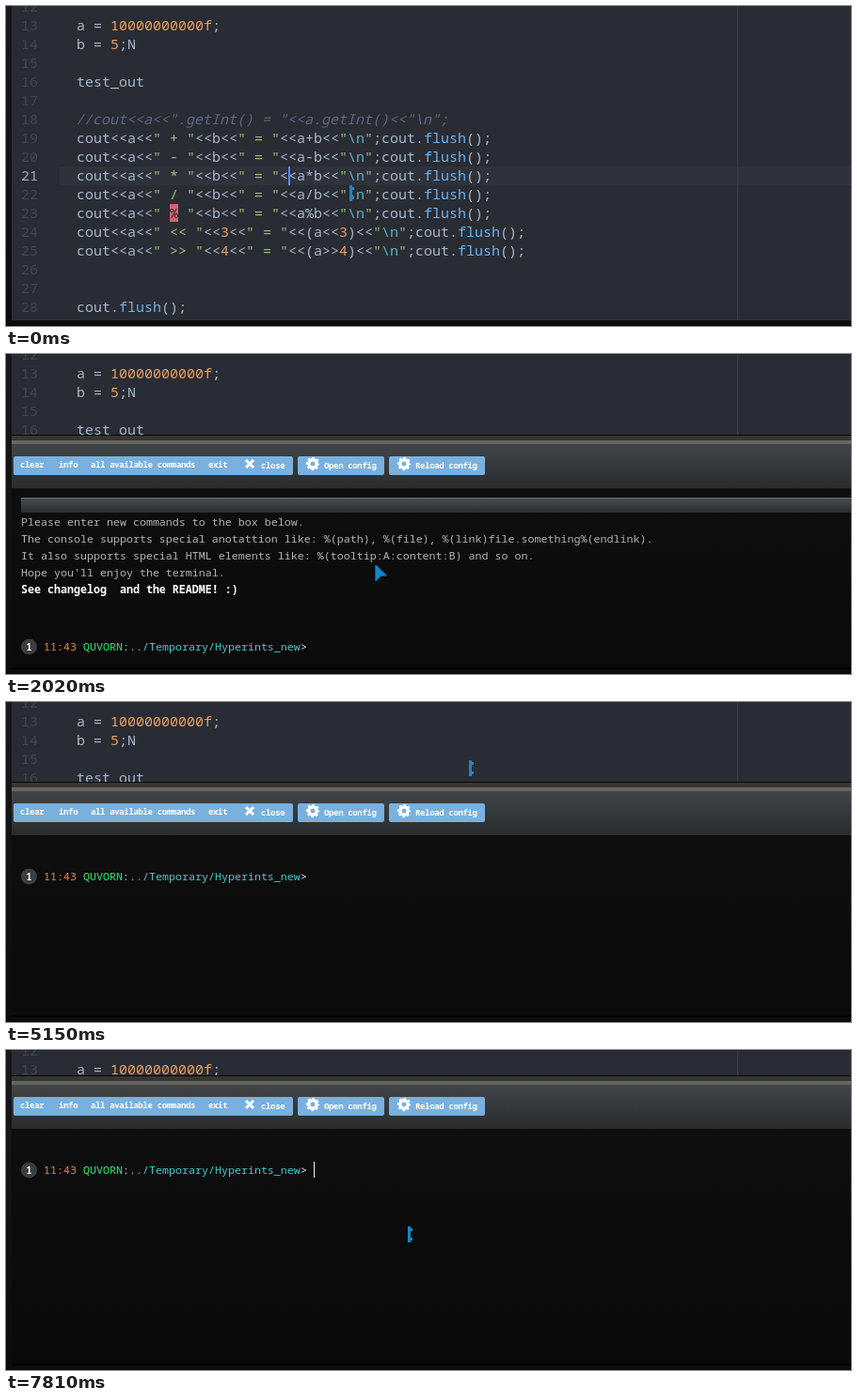
An HTML page with a canvas that plays this animation: 898x341 px, repeating every 8000 ms.

```html
<!DOCTYPE html>
<html lang="en">
<head>
<meta charset="utf-8">
<title>Editor with terminal panel</title>
<style>
html, body { margin: 0; width: 898px; height: 341px; overflow: hidden; background: #0c0c0d; }
canvas { display: block; }
</style>
</head>
<body>
<canvas id="stage" width="898" height="341"></canvas>
<script>
const ctx = document.getElementById('stage').getContext('2d');
const LOOP = 8000, BOTTOM = 335, RIGHT = 898;
const FAMILY = '"Noto Sans Mono", "DejaVu Sans Mono", monospace';
const CODE_FONT = `15px ${FAMILY}`;
const TERM_FONT = `11.67px ${FAMILY}`;
const PROMPT_FONT = `500 ${TERM_FONT}`;
const BUTTON_FONT = `bold 9px ${FAMILY}`;
const PLAIN = '#a5b7cd';

const operation = op => `cout<<a<<" ${op} "<<b<<" = "<<a${op}b<<"\\n";cout.flush();`;
const shift = (op, n) => `cout<<a<<" ${op} "<<${n}<<" = "<<(a${op}${n})<<"\\n";cout.flush();`;
const FIRST_LINE = 12;
const code = [
  '', 'a = 10000000000f;', 'b = 5;N', '', 'test_out', '',
  '//cout<<a<<".getInt() = "<<a.getInt()<<"\\n";',
  ...['+', '-', '*', '/', '%'].map(operation),
  shift('<<', 3), shift('>>', 4), '', '', 'cout.flush();'
];
const welcome = [
  'Please enter new commands to the box below.',
  'The console supports special anotattion like: %(path), %(file), %(link)file.something%(endlink).',
  'It also supports special HTML elements like: %(tooltip:A:content:B) and so on.',
  "Hope you'll enjoy the terminal.",
  'See changelog  and the README! :)'
];
const listing = 'README.md  changelog.txt  hyperints.cpp  hyperints.h  script.cpp';

// Keys are [time, value, ...]
const panelKeys = [[910, 335], [1120, 231], [1330, 150], [1680, 87], [2440, 87], [2860, 212],
  [4800, 212], [5150, 86], [5360, 28]];
const mouseKeys = [[280, 364, 191], [490, 385, 175], [1190, 385, 175], [1680, 392, 225],
  [2230, 392, 225], [2440, 465, 91], [2860, 466, 208], [3210, 466, 208], [3280, 471, 222],
  [3630, 498, 221], [3980, 498, 224], [4450, 498, 220], [4590, 498, 220], [4730, 493, 209],
  [4870, 491, 205], [5150, 491, 62], [5360, 491, 24], [5640, 427, 188]];

const within = (t, a, b) => t >= a && t < b;

function track(keys, t) {
  const i = keys.findIndex(k => k[0] > t);
  if (i === 0) return keys[0].slice(1);
  if (i < 0) return keys[keys.length - 1].slice(1);
  const a = keys[i - 1], b = keys[i], u = (t - a[0]) / (b[0] - a[0]);
  return a.slice(1).map((v, j) => Math.round(v + (b[j + 1] - v) * u));
}

function rect(x, y, w, h, fill) {
  ctx.fillStyle = fill;
  ctx.fillRect(x, y, w, h);
}

function shade(y, h, from, to) {
  const g = ctx.createLinearGradient(0, y, 0, y + h);
  g.addColorStop(0, from);
  g.addColorStop(1, to);
  return g;
}

function text(str, x, y, color, font) {
  ctx.font = font;
  ctx.fillStyle = color;
  ctx.fillText(str, x, y);
}

function drawCode(line, y) {
  if (line.startsWith('//')) return text(line, 74, y, '#5a6785', `italic ${CODE_FONT}`);
  let x = 75, quoted = false;
  for (const token of line.match(/\\n|\w+|./g) || []) {
    let color = PLAIN;
    if (token === '"') quoted = !quoted;
    if (token === '\\n') color = '#56b6c2';
    else if (quoted || token === '"') color = '#98c379';
    else if (/^\d/.test(token)) color = '#e5a064';
    else if (token === 'flush') color = '#6cb2ee';
    if (quoted && token === '%') {
      rect(x, y - 15, 9, 19, '#cf6670');
      color = '#30252b';
    }
    text(token, x, y, color, CODE_FONT);
    x += 9 * token.length;
  }
}

function drawEditor(t) {
  rect(0, 0, RIGHT, 341, '#0c0c0d');
  rect(0, 0, 6, 341, shade(0, 341, '#17181b', '#0b0b0c'));
  rect(6, 0, RIGHT, BOTTOM, '#2a2c33');
  rect(57, 171, RIGHT, 20, '#2f323a');
  rect(777, 0, 1, BOTTOM, '#383b42');
  code.forEach((line, i) => {
    const n = FIRST_LINE + i, y = 6 + i * 20;
    text(String(n), 16, y, n === 21 ? '#a3acba' : '#42464f', CODE_FONT);
    drawCode(line, y);
  });
  if (t < 140 || within(t, 490, 840)) rect(300, 171, 2, 20, '#528bff');
}

function drawGear(x, y) {
  const ring = (r, w, dash) => {
    ctx.lineWidth = w;
    ctx.setLineDash(dash);
    ctx.beginPath();
    ctx.arc(x, y, r, 0, 7);
    ctx.stroke();
  };
  const tooth = Math.PI * 6 / 8;
  ctx.strokeStyle = '#fff';
  ring(4.2, 3.4, []);
  ctx.lineDashOffset = tooth / 2;
  ring(6, 2.4, [tooth, tooth]);
  ctx.setLineDash([]);
}

function drawToolbar(top) {
  rect(6, top + 9, RIGHT, 47, shade(top + 9, 47, '#414547', '#292b2d'));
  for (const [x, w] of [[8, 297], [310, 92], [407, 102]]) {
    ctx.fillStyle = '#79b0de';
    ctx.beginPath();
    ctx.roundRect(x, top + 22, w, 20, 2);
    ctx.fill();
  }
  ctx.letterSpacing = '-0.35px';
  const labels = [['clear', 15, 34], ['info', 56, 34], ['all available commands', 90, 34],
    ['exit', 215, 34], ['close', 271, 35], ['Open config', 338, 35], ['Reload config', 435, 35]];
  for (const [label, x, dy] of labels) text(label, x, top + dy, '#fff', BUTTON_FONT);
  ctx.letterSpacing = '0px';
  ctx.strokeStyle = '#fff';
  ctx.lineWidth = 3;
  ctx.beginPath();
  for (const s of [-1, 1]) {
    ctx.moveTo(259 - 4, top + 30 - 4 * s);
    ctx.lineTo(259 + 4, top + 30 + 4 * s);
  }
  ctx.stroke();
  drawGear(326, top + 30);
  drawGear(423, top + 30);
}

function drawPrompt(y, typed, caret) {
  ctx.fillStyle = '#3c3d3e';
  ctx.beginPath();
  ctx.arc(24.5, y, 8.5, 0, 7);
  ctx.fill();
  text('1', 21.5, y + 4, '#fff', `bold 10px ${FAMILY}`);
  const parts = [['11:43', 40, '#e8883a'], ['QUVORN', 82, '#20f070'], [':', 124, '#c5d5d5'],
    ['../Temporary/Hyperints_new', 131, '#3ccfcf'], ['>', 313, '#e8e8e8'], [typed, 327, '#e8e8e8']];
  for (const [str, x, color] of parts) text(str, x, y + 4, color, PROMPT_FONT);
  if (caret) rect(327 + 7 * typed.length, y - 9, 1, 17, '#f4f4f4');
}

function drawWelcome(y) {
  rect(16, y, RIGHT, 16, shade(y, 16, '#4b4e50', '#292c2e'));
  rect(16, y, RIGHT, 1, '#66696b');
  welcome.forEach((line, i) => {
    const last = i === welcome.length - 1;
    text(line, 16, y + 30 + i * 18, last ? '#fff' : '#b4b4b4', last ? `bold ${TERM_FONT}` : TERM_FONT);
  });
}

function drawTerminal(t, top) {
  if (t < 4870) {
    // The output stays put while the panel shrinks over it.
    const base = t < 2020 ? top : 87;
    drawWelcome(base + 66);
    drawPrompt(base + 225, '', within(t, 2090, 2300) || within(t, 3280, 3630));
    return;
  }
  const listed = within(t, 6620, 7740);
  const first = t < 6340 || t >= 7740 ? '' : t < 6410 ? 'l' : 'ls';
  const caret = within(t, 5780, 6200) || within(t, 6340, 6620) || t >= 7740;
  drawPrompt(top + 100, first, caret);
  if (listed) {
    const count = Math.max(0, Math.floor((t - 7390) / 70) + 1);
    text(listing, 16, top + 122, '#b4b4b4', TERM_FONT);
    drawPrompt(top + 155, 'clear'.slice(0, count), within(t, 6690, 7250) || t >= 7390);
  }
}

function drawPanel(t) {
  if (t < 980) return;
  const [top] = track(panelKeys, t);
  ctx.save();
  ctx.beginPath();
  ctx.rect(6, top - 1, RIGHT, BOTTOM - top + 1);
  ctx.clip();
  rect(6, top - 1, RIGHT, BOTTOM, '#101214');
  rect(6, top - 1, RIGHT, 1, '#08080a');
  rect(6, top, RIGHT, 5, '#363531');
  rect(6, top + 5, RIGHT, 4, '#666562');
  if (t >= 1400) drawToolbar(top);
  else rect(6, top + 9, RIGHT, 2, '#1c3048');
  ctx.beginPath();
  ctx.rect(6, top + 56, RIGHT, BOTTOM);
  ctx.clip();
  rect(6, top + 56, RIGHT, BOTTOM, shade(top + 56, 200, '#0e0e0f', '#0a0a0a'));
  drawTerminal(t, top);
  ctx.restore();
  rect(6, BOTTOM - 1, RIGHT, 2, '#000');
}

function drawMouse(t) {
  const [x, y] = track(mouseKeys, t);
  const beam = t < 2020 || within(t, 4730, 5640) || t >= 6620;
  if (beam) {
    const left = t >= 6620 ? x - 1 : x;
    rect(left + 1, y, 3, 17, '#1b86c8');
    rect(left + 3, y + 2, 3, 3, '#1b86c8');
    rect(left + 3, y + 12, 3, 3, '#1b86c8');
    return;
  }
  ctx.fillStyle = '#1286cb';
  ctx.strokeStyle = '#0d5c8c';
  ctx.lineWidth = 1;
  ctx.beginPath();
  for (const [dx, dy] of [[0.5, 0.5], [2, 0.5], [12.5, 11], [6, 12], [1.5, 16.5], [0.5, 16.5]]) {
    ctx.lineTo(x + dx, y + dy);
  }
  ctx.closePath();
  ctx.fill();
  ctx.stroke();
}

function frame() {
  const t = performance.now() % LOOP;
  drawEditor(t);
  drawPanel(t);
  drawMouse(t);
  requestAnimationFrame(frame);
}
frame();
</script>
</body>
</html>
```
